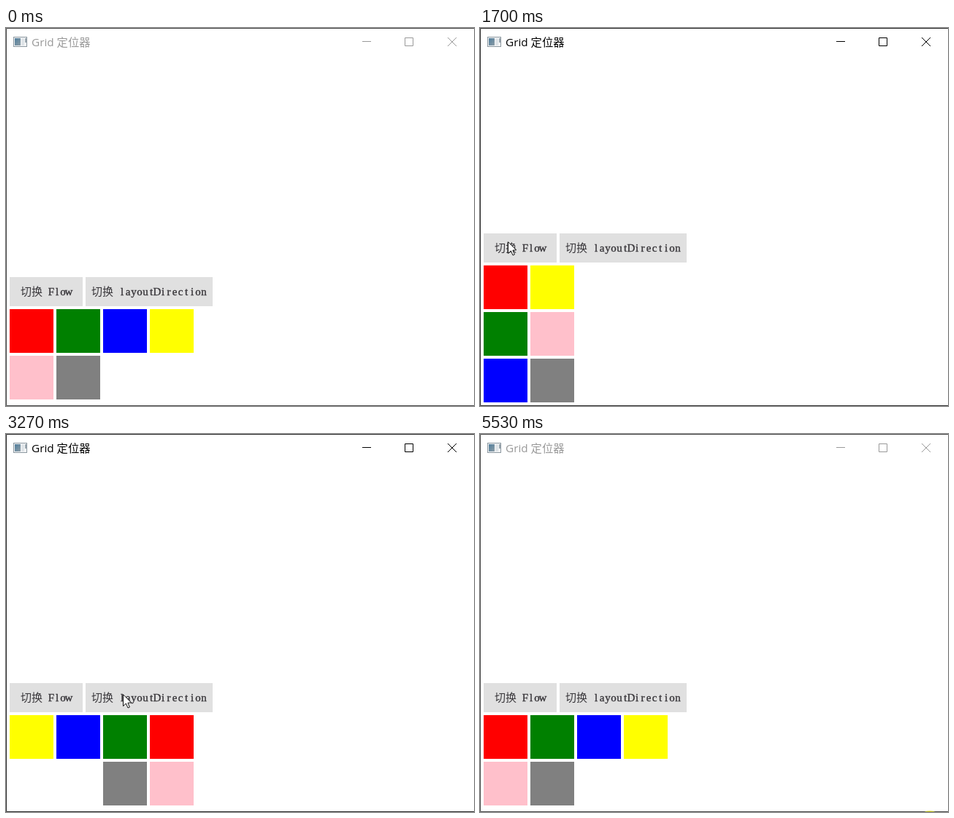
An HTML page for the animation above (5.61 s loop, 641 by 519 pixels).

```html
<!DOCTYPE html>
<html lang="zh">
<head>
<meta charset="utf-8">
<title>Grid</title>
<style>
  html, body { margin: 0; width: 100%; height: 100%; overflow: hidden; background: #fff; }
  svg { display: block; }
  #title { font: 15.3px "Open Sans", "Noto Sans CJK SC", "Noto Sans CJK", sans-serif; }
  .label { font: 15px "Liberation Serif", "Noto Sans CJK SC", "Noto Sans CJK", serif;
           fill: #3a383c; text-anchor: middle; }
  .latin { stroke: #3a383c; stroke-width: .4; }
</style>
</head>
<body>
<svg width="641" height="519" viewBox="0 0 641 519">
  <defs>
    <linearGradient id="pane" x2="1" y2="1">
      <stop stop-color="#4f7d9c"/><stop offset="1" stop-color="#8d9da6"/>
    </linearGradient>
  </defs>
  <rect width="641" height="519" fill="#fff"/>
  <path id="border" d="M641 .5H.5V518.5H641" fill="none"/>
  <g id="icon">
    <rect x="10.5" y="12.5" width="18" height="13" fill="#f5f6f7" stroke="#8b979f"/>
    <rect x="12" y="14" width="8" height="10" fill="url(#pane)"/>
    <rect x="21" y="14" width="4" height="10" fill="#dfe4e8"/>
    <rect x="26" y="14" width="2" height="6" fill="#9aa7b0"/>
  </g>
  <text id="title" x="35" y="25">Grid 定位器</text>
  <path id="controls" d="M488 18.5H500M546.5 13.5H557.5V24.5H546.5ZM605 13L617 25M617 13L605 25" fill="none"/>
  <g id="buttons"></g>
  <g id="tiles"></g>
  <path id="cursor" d="M.5 .7V16.6L4.4 13L7 19L9.4 18L6.9 12.2L11.6 11.9Z" fill="#fff" stroke="#111"/>
  <circle id="halo" r="15" fill="#ff0" fill-opacity=".47"/>
</svg>
<script>
const LOOP = 5610, SAMPLE = 75, GAP = 4, SIZE = 60;
const COLORS = ['red', 'green', 'blue', 'yellow', 'pink', 'gray'];
const $ = id => document.getElementById(id);

function add(parent, tag, attrs) {
  const el = document.createElementNS('http://www.w3.org/2000/svg', tag);
  for (const k in attrs) el.setAttribute(k, attrs[k]);
  return parent.appendChild(el);
}

// Fixed-pitch label, centred on its button.
function addButton(x, width, text) {
  const chars = [...text];
  const isLatin = c => c < '\u2000';
  const pitch = c => isLatin(c) ? 8 : 15;
  let pen = x + (width - chars.reduce((sum, c) => sum + pitch(c), 0)) / 2;
  add($('buttons'), 'rect', { x, y: 342, width, height: 40, fill: '#e0e0e0' });
  for (const c of chars) {
    const cls = isLatin(c) ? 'label latin' : 'label';
    add($('buttons'), 'text', { class: cls, x: pen + pitch(c) / 2, y: 367 }).textContent = c;
    pen += pitch(c);
  }
}

addButton(5, 100, '切换 Flow');
addButton(109, 174, '切换 layoutDirection');
const tiles = COLORS.map(fill => add($('tiles'), 'rect', { width: SIZE, height: SIZE, fill }));

// Tile index to [column, row]
const layouts = {
  row: i => [i % 4, Math.floor(i / 4)],
  column: i => [Math.floor(i / 3), i % 3],
  mirrored: i => [3 - i % 4, Math.floor(i / 4)]
};

// The layout changes when the mouse button is released.
const clicks = [
  { press: 1020, release: 1100, layout: 'column' },
  { press: 2310, release: 2420, layout: 'row' },
  { press: 3190, release: 3270, layout: 'mirrored' },
  { press: 4060, release: 4220, layout: 'row' },
  { press: 5530, release: LOOP, layout: 'row' }
];

// Mouse strokes as quadratic curves; the pointer rests below the stage between loops.
const outside = [616, 532], flow = [38, 357], raised = [38, 293];
const direction = [160, 357], rest = [177, 359];
const glides = [
  { start: 250, end: 700, from: [130, 480], bend: [64, 383], to: flow },
  { start: 1250, end: 1700, from: flow, bend: [86, 566], to: raised },
  { start: 2500, end: 3110, from: raised, bend: [110, 345], to: direction },
  { start: 3500, end: 3760, from: direction, bend: [172, 357], to: rest },
  { start: 4760, end: 4980, from: rest, bend: [390, 497], to: outside }
];

// The pointer is sampled at a coarse rate, so it moves in hard steps.
function pointer(t) {
  const g = glides.findLast(g => t >= g.start);
  if (!g) return outside;
  const gaps = Math.round((g.end - g.start) / SAMPLE);
  const step = Math.floor((t - g.start) / (g.end - g.start) * gaps);
  const u = Math.min(1, (step + 1) / (gaps + 1)), v = 1 - u;
  return g.from.map((p, k) => Math.round(v * v * p + 2 * u * v * g.bend[k] + u * u * g.to[k]));
}

const move = (el, pos) => el.setAttribute('transform', `translate(${pos})`);

function draw(t) {
  const done = clicks.findLast(c => t >= c.release);
  const layout = done ? done.layout : 'row';
  const rise = layout === 'column' ? 60 : 0;
  const active = t >= clicks[0].press && t < clicks.at(-1).press;
  const pressed = clicks.some(c => t >= c.press && t < c.release);

  move($('buttons'), [0, -rise]);
  tiles.forEach((tile, i) => {
    const [col, row] = layouts[layout](i);
    move(tile, [5 + col * (SIZE + GAP), 386 - rise + row * (SIZE + GAP)]);
  });
  $('title').setAttribute('fill', active ? '#000' : '#999');
  $('controls').setAttribute('stroke', active ? '#000' : '#999');
  $('border').setAttribute('stroke', active ? '#2a2a2a' : '#484848');
  move($('cursor'), pointer(t));
  move($('halo'), pointer(t));
  $('halo').style.display = pressed ? '' : 'none';
}

const origin = performance.now();
function tick() {
  draw((performance.now() - origin) % LOOP);
  requestAnimationFrame(tick);
}
tick();
</script>
</body>
</html>
```
